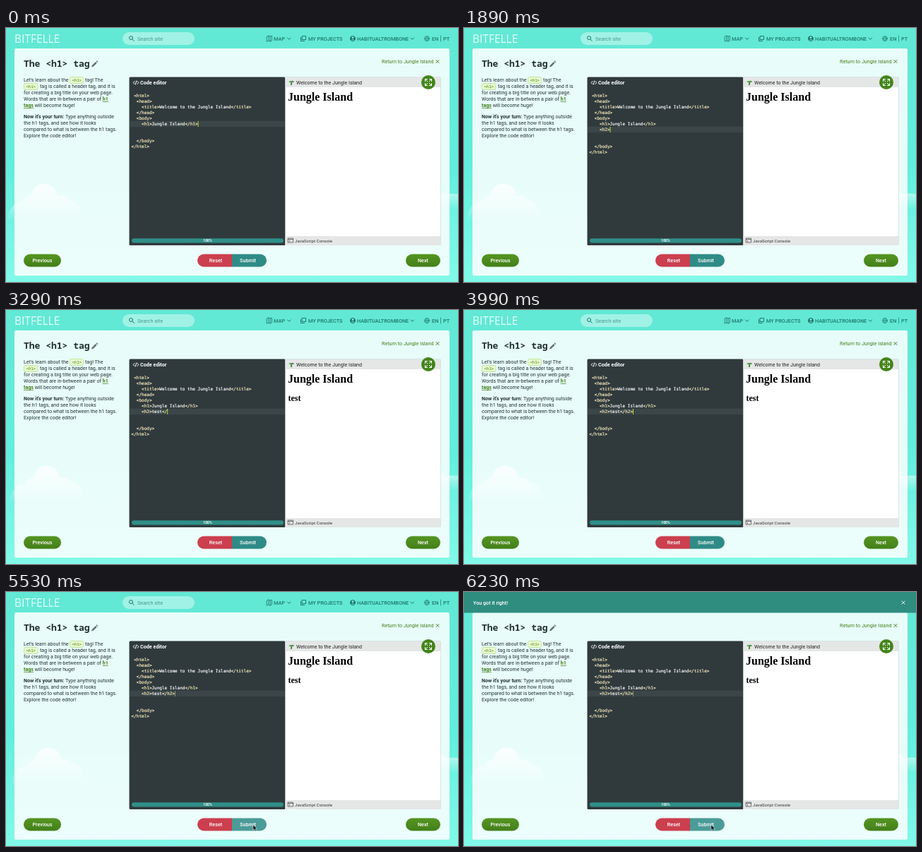
Recreate the animation shown at these times as an HTML page. Size 640 by 360 pixels, loop 6300 ms.

```html
<!DOCTYPE html>
<html lang="en">
<head>
<meta charset="utf-8">
<title>Code lesson</title>
<style>
  html, body { margin: 0; width: 100%; height: 100%; overflow: hidden; }
  svg { display: block; width: 640px; height: 360px; }
  text { font: 7.2px Roboto, sans-serif; white-space: pre; }
  .bold { font-weight: 700; }
  .mid { text-anchor: middle; }
  .copy text { font-size: 7.1px; fill: #243236; }
  .nav text { font-size: 7.3px; font-weight: 500; fill: #1d776c; }
  .button text { font-weight: 500; fill: #fff; text-anchor: middle; }
  .green, .copy .green { fill: #427f1c; }
  .chip rect { fill: #eafbcf; stroke: #a9d77a; stroke-width: .6; }
  .copy .chip text { font: 5.6px "DejaVu Sans Mono", monospace; fill: #427f1c; }
  .title { font: 700 13px "Noto Sans Mono", monospace; fill: #20302f; }
  .page { font-family: "Liberation Serif", serif; font-weight: 700; }
  #code text { font: 6px "DejaVu Sans Mono", monospace; fill: #fff; stroke: #fff; stroke-width: .15; }
  #code tspan { fill: #fbeec0; stroke: #fbeec0; }
  .line { fill: none; stroke-width: 1; stroke-linecap: round; stroke-linejoin: round; }
</style>
</head>
<body>
<svg viewBox="0 0 640 360">
  <defs>
    <linearGradient id="sky" x2="0" y2="1">
      <stop stop-color="#62e8d4"/><stop offset=".55" stop-color="#62eedc"/><stop offset="1" stop-color="#82f9e8"/>
    </linearGradient>
    <linearGradient id="leaf" x2="0" y2="1">
      <stop stop-color="#559522"/><stop offset="1" stop-color="#437f19"/>
    </linearGradient>
    <linearGradient id="mist" x2="0" y2="1">
      <stop stop-color="#fff" stop-opacity=".8"/><stop offset="1" stop-color="#fff" stop-opacity="0"/>
    </linearGradient>
    <clipPath id="split"><rect x="271" y="320.5" width="98" height="18" rx="9"/></clipPath>
  </defs>

  <rect width="640" height="360" fill="url(#sky)"/>
  <g id="clouds" fill="url(#mist)">
    <path d="M2 274q2-26 20-27 6-10 13-9 5-18 19-17 15 0 19 17 11-3 15 5 17 1 22 31z"/>
    <path d="M528 250q4-9 15-8 4-12 17-10 6-14 22-11 14 0 18 10 12-4 18 5 14-4 42 4v16H528z"/>
  </g>
  <rect x="12" y="29" width="616" height="322" rx="2" fill="#fff" opacity=".85"/>

  <g class="nav">
    <text x="12" y="21" style="font:400 15.5px 'Open Sans',sans-serif;fill:#e6fffa">BITFELLE</text>
    <rect x="165" y="6" width="102" height="18" rx="9" fill="#fff" opacity=".4"/>
    <text x="186" y="17.5" style="font-weight:400;fill:#46988e">Search site</text>
    <text x="379" y="17.5">MAP</text>
    <text x="428" y="17.5">MY PROJECTS</text>
    <text x="497" y="17.5">HABITUALTROMBONE</text>
    <text x="603" y="17.5">EN</text><text x="619" y="17.5">PT</text>
    <g class="line" stroke="#1d776c">
      <circle cx="177" cy="14" r="2.5"/><path d="M179 16l2.3 2.3"/>
      <path d="M369.5 12l2.3-1 2.3 1 2.3-1v7l-2.3 1-2.3-1-2.3 1zM371.800 11v7M374.100 12v7" stroke-width=".8"/>
      <path d="M398.500 14l2.300 2.300 2.300-2.300M573 14l2.300 2.300 2.300-2.300"/>
      <path d="M419.500 11.500h5v5h-5zM417.500 13.500v5h5"/>
      <circle cx="491" cy="15" r="3.500" fill="#1d776c"/>
      <g stroke-width=".7"><circle cx="596" cy="15" r="3.500"/><ellipse cx="596" cy="15" rx="1.500" ry="3.500"/><path d="M592.500 15h7M615.500 11v8"/></g>
    </g>
    <path d="M489.500 13.500a1.500 1.500 0 0 1 3 0a1.500 1.500 0 0 1-3 0M488.500 17.500q2.500-3 5 0z" fill="#7bebda"/>
  </g>

  <text class="title" x="25" y="55">The &lt;h1&gt; tag</text>
  <path d="M121 55.500l.8-2.600 5-5 1.900 1.900-5 5zM127.500 47.200l1-1 1.900 1.900-1 1z" fill="#65746f"/>
  <text class="green" x="532" y="50">Return to Jungle Island</text>
  <path class="line" stroke="#427f1c" d="M609 45.500l4 4m0-4l-4 4"/>

  <g class="copy">
    <text x="25" y="76.300">Let's learn about the</text>
    <g class="chip"><rect x="90.500" y="69.500" width="19" height="9" rx="2"/><text x="93.500" y="76">&lt;h1&gt;</text></g>
    <text x="112" y="76.300">tag! The</text>
    <g class="chip"><rect x="25.500" y="78.500" width="19.500" height="9" rx="2"/><text x="28.500" y="85">&lt;h1&gt;</text></g>
    <text x="48" y="85.300">tag is called a header tag, and it is</text>
    <text x="25" y="94.300">for creating a big title on your web page.</text>
    <text x="25" y="103.200">Words that are in-between a pair of <tspan class="bold green" text-decoration="underline">h1</tspan></text>
    <text x="25" y="112.200"><tspan class="bold green" text-decoration="underline">tags</tspan> will become huge!</text>
    <text x="25" y="128.300"><tspan class="bold">Now it's your turn:</tspan> Type anything outside</text>
    <text x="25" y="137.300">the h1 tags, and see how it looks</text>
    <text x="25" y="146.300">compared to what is between the h1 tags.</text>
    <text x="25" y="155.300">Explore the code editor!</text>
  </g>

  <rect x="395" y="69.500" width="220.500" height="238.500" rx="1" fill="#c3cfce"/>
  <rect x="174.500" y="69.500" width="221" height="238.500" rx="1.500" fill="#303a3d"/>
  <path class="line" stroke="#fff" d="M182 75.500l-1.800 2 1.800 2M186 75.500l1.800 2-1.800 2M184.700 75l-1.400 5"/>
  <text class="bold" x="190" y="80" fill="#fff">Code editor</text>
  <rect id="active" x="175" width="220" height="8.500" fill="#fff" opacity=".06"/>
  <g id="code"></g>
  <rect id="caret" width="1" height="8"/>
  <rect x="178" y="298.200" width="215" height="6.200" rx="3.100" fill="#2f8f88"/>
  <text class="mid bold" x="285.500" y="303.200" fill="#fff" style="font-size:5px">100%</text>

  <rect x="395.500" y="70" width="219.500" height="237.500" fill="#fff"/>
  <path d="M395.500 70h219.500v14H395.500zM395.500 295h219.500v12.500H395.500z" fill="#e5e6e6"/>
  <path d="M400.500 77q1-3 3.500-1.500 3-2 4 1.500l-2.600-.6-.7 4.600h-1.800l.4-4.600z" fill="#3f8a35"/>
  <text x="411" y="80" fill="#222" style="font-size:7.100px">Welcome to the Jungle Island</text>
  <path class="line" stroke="#555" style="stroke-width:.8" d="M399.500 298h7v6h-7zM399.500 299.500h7M401 301.300l1 .8-1 .8"/>
  <text x="409" y="303.700" fill="#333" style="font-size:6.200px">JavaScript Console</text>
  <text class="page" x="399" y="103" style="font-size:16px">Jungle Island</text>
  <text class="page" id="heading" x="399.500" y="129" style="font-size:12px"></text>
  <circle cx="598" cy="77" r="10" fill="#43851b"/>
  <path class="line" stroke="#fff" d="M593.500 75.500v-3h3m-3 0l3.200 3.200M599.500 72.500h3v3m0-3l-3.200 3.200M593.500 78.500v3h3m-3 0l3.200-3.200M599.500 81.500h3v-3m0 3l-3.200-3.200"/>

  <g class="button">
    <rect x="25" y="320.500" width="53" height="18" rx="9" fill="url(#leaf)"/><text x="51.500" y="331.700">Previous</text>
    <rect x="566" y="320.500" width="49" height="18" rx="9" fill="url(#leaf)"/><text x="590.500" y="331.700">Next</text>
    <g clip-path="url(#split)">
      <path d="M271 320h49v19h-49z" fill="#cb3f4e"/><path id="submit" d="M320 320h49v19h-49z"/>
    </g>
    <text x="297" y="331.700">Reset</text><text x="342.500" y="331.700">Submit</text>
  </g>

  <g id="toast">
    <rect width="640" height="29.500" fill="#2f8d80"/>
    <text x="13" y="17.500" fill="#fff" style="font-weight:500">You got it right!</text>
    <path class="line" stroke="#fff" d="M620 13l4 4m0-4l-4 4"/>
  </g>
  <g id="pointer">
    <path id="beam" class="line" stroke="#1c2326" style="stroke-width:.8" d="M-1.500-3.500q1.500 0 1.500 1v5q0 1-1.500 1M1.500-3.500q-1.500 0-1.500 1M0 2.500q0 1 1.500 1"/>
    <path id="arrow" d="M0-3v7.500l1.700-1.600 1.200 2.800 1.300-.6-1.200-2.700h2.300z" fill="#000" stroke="#fff" stroke-width=".5"/>
  </g>
</svg>
<script>
const LOOP = 6300, STEP = 70;
const CHAR = 3.612, LEFT = 177.6, TOP = 98, ROW = 8;
const ENTER = 420, BLUR = 5390, TOAST = 5560;
const typed = "<h2>test</h2>";
const keyTimes = [980, 1260, 1540, 1750, 2170, 2310, 2450, 2590, 2940, 3150, 3430, 3640, 3920];
const before = [" <html>", "  <head>", "    <title>Welcome to the Jungle Island</title>",
  "  </head>", "  <body>", "    <h1>Jungle Island</h1>"];
const after = ["", "", "  </body>", "</html>"];
const path = [[4620, 301, 168], [4830, 304, 181], [5250, 350, 333]];

const $ = id => document.getElementById(id);
const set = (id, attrs) => { for (const k in attrs) $(id).setAttribute(k, attrs[k]); };
const show = (id, on) => set(id, { visibility: on ? "visible" : "hidden" });
const clamp = v => Math.max(0, Math.min(1, v));
const smooth = v => v * v * (3 - 2 * v);
const escapeTags = s => s.replace(/</g, "&lt;").replace(/>/g, "&gt;");
const colour = s => s.split(/(<[^>]*>?)/)
  .map(p => p[0] === "<" ? `<tspan>${escapeTags(p)}</tspan>` : p).join("");

let shown = "";
function drawCode(lines) {
  const html = lines.map((s, i) => `<text x="${LEFT}" y="${TOP + i * ROW}">${colour(s)}</text>`).join("");
  if (html !== shown) $("code").innerHTML = shown = html;
}

function pointerAt(t) {
  const i = t < path[1][0] ? 0 : 1;
  const [a, b] = [path[i], path[i + 1]];
  const k = smooth(clamp((t - a[0]) / (b[0] - a[0])));
  return [a[1] + (b[1] - a[1]) * k, a[2] + (b[2] - a[2]) * k];
}

function draw(now) {
  const t = Math.floor(now % LOOP / STEP) * STEP;
  const keys = keyTimes.filter(k => k <= t).length;
  const lines = t < ENTER ? before : [...before, "    " + typed.slice(0, keys)];
  const row = lines.length - 1;
  drawCode([...lines, ...after]);
  set("active", { y: TOP + row * ROW - 6.3 });

  const lastKey = keys ? keyTimes[keys - 1] : t < ENTER ? 0 : ENTER;
  const blurred = t >= BLUR;
  set("caret", { x: LEFT + lines[row].length * CHAR, y: TOP + row * ROW - 6,
    fill: blurred ? "#7d8a72" : "#a6e22e" });
  show("caret", blurred || (t - lastKey) % 1000 < 500);
  $("heading").textContent = typed.slice(4, Math.max(4, Math.min(keys, 8)));

  const [x, y] = pointerAt(t), moving = t >= path[0][0];
  set("pointer", { transform: `translate(${x} ${y})` });
  show("beam", moving && y < 307);
  show("arrow", moving && y >= 307);
  set("submit", { fill: moving && y > 320 ? "#4b9b98" : "#2f8b86" });

  const drop = 1 - (1 - clamp((t - TOAST) / 280)) ** 3;
  set("toast", { transform: `translate(0 ${-30 * (1 - drop)})` });
  set("clouds", { transform: `translate(${t / 1000} 0)` });
}

function tick(now) {
  draw(now);
  requestAnimationFrame(tick);
}
draw(0);
requestAnimationFrame(tick);
</script>
</body>
</html>
```
